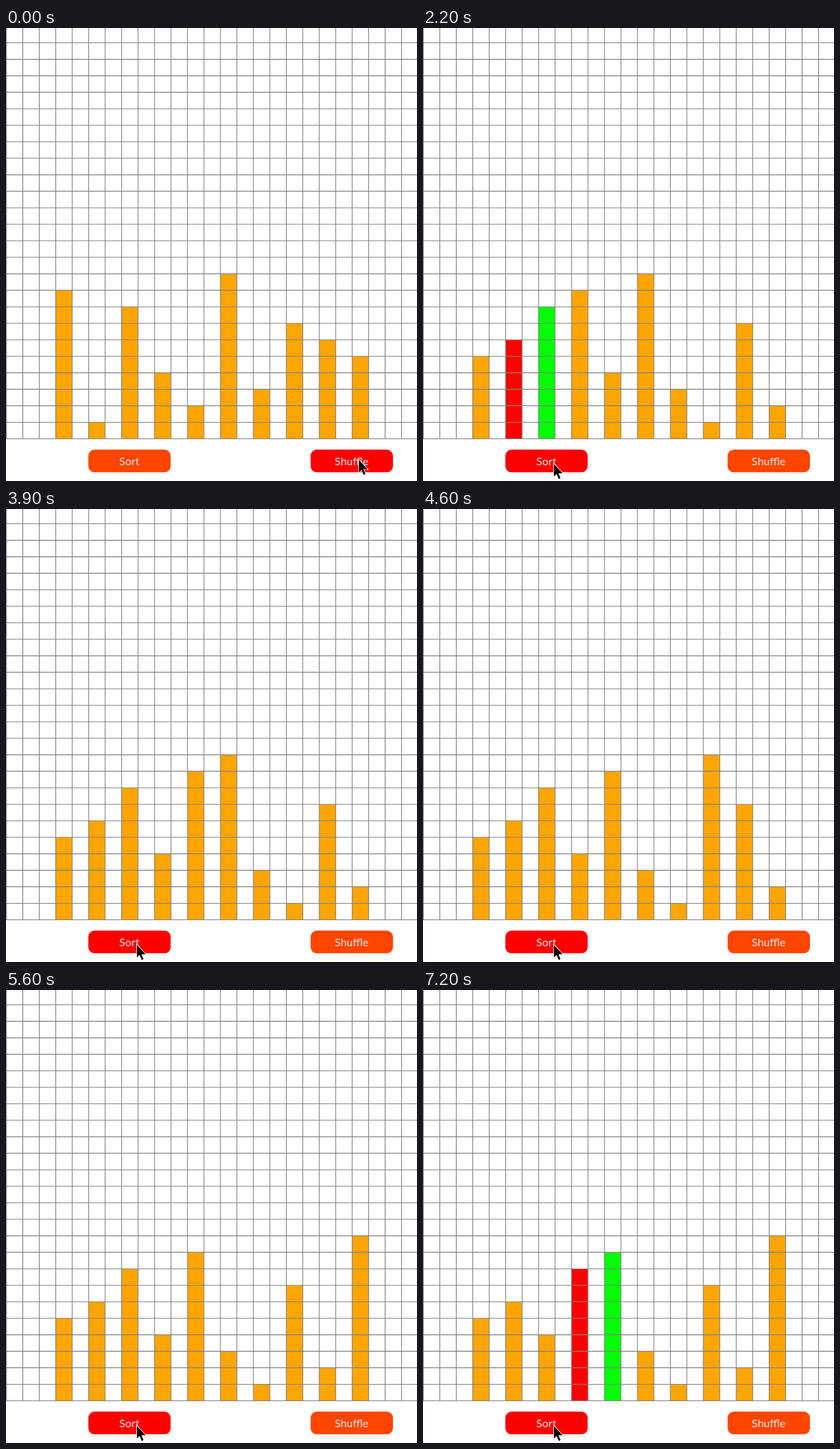
Animation, 600 px wide and 660 px high, one loop 7400 ms. Source, as an HTML page with a canvas:

```html
<!DOCTYPE html>
<html lang="en">
<head>
<meta charset="utf-8">
<title>Bubble sort</title>
<style>
  html, body { margin: 0; width: 600px; height: 660px; overflow: hidden; background: #fff; }
  canvas { display: block; }
</style>
</head>
<body>
<canvas id="stage" width="600" height="660"></canvas>
<script>
const ctx = document.getElementById("stage").getContext("2d");
const LOOP = 7400, TICK = 100;
const CELL = 24.04, LEFT = 0.5, FLOOR = 598.5;

const BEFORE = [9, 1, 8, 4, 2, 10, 3, 7, 6, 5];
const SHUFFLED = [5, 6, 8, 9, 4, 10, 3, 1, 7, 2];
const SHUFFLE_AT = 100;

// Each comparison is highlighted for a while, then swapped if needed
const SORT_AT = 1660, STEP = 458, HIGHLIGHT = 190;

const BUTTONS = [{ label: "Sort", x: 120.2 }, { label: "Shuffle", x: 444.7 }];
const BUTTON = { y: 614.3, w: 120.2, h: 33, r: 9 };

function ease(u) {
  u = Math.min(1, Math.max(0, u));
  return u * u * (3 - 2 * u);
}

function barsAt(t) {
  if (t < SHUFFLE_AT) return { heights: BEFORE, active: -1 };
  const heights = [...SHUFFLED];
  let active = -1;
  for (let step = 0, start = SORT_AT; start <= t; step++, start += STEP) {
    const i = step % (heights.length - 1);
    if (t < start + HIGHLIGHT) active = i;
    else if (heights[i] > heights[i + 1])
      [heights[i], heights[i + 1]] = [heights[i + 1], heights[i]];
  }
  return { heights, active };
}

// From "Shuffle" to "Sort" along a shallow arc, then a slight settle upwards
function pointerAt(t) {
  const k = ease(t / 1000), settle = ease((t - 1100) / 200);
  return [515 - 324 * k, 629 + 8 * k - 30 * Math.sin(Math.PI * k) - 2 * settle];
}

function drawBars({ heights, active }) {
  heights.forEach((h, i) => {
    const isPair = active >= 0 && (i === active || i === active + 1);
    ctx.fillStyle = !isPair ? "#ffa500" : i === active ? "#f00" : "#0f0";
    ctx.fillRect(LEFT + (3 + 2 * i) * CELL, FLOOR - h * CELL, CELL, h * CELL);
  });
}

function drawGrid() {
  ctx.beginPath();
  for (let x = LEFT; x < 600; x += CELL) { ctx.moveTo(x, 0); ctx.lineTo(x, FLOOR); }
  for (let y = FLOOR; y > 0; y -= CELL) { ctx.moveTo(0, y); ctx.lineTo(600, y); }
  ctx.strokeStyle = "#808080";
  ctx.lineWidth = 1.1;
  ctx.stroke();
}

function drawButton({ label, x }, [px, py]) {
  const { y, w, h, r } = BUTTON;
  const hover = px >= x && px <= x + w && py >= y && py <= y + h;
  ctx.fillStyle = hover ? "#f00" : "#ff4500";
  ctx.beginPath();
  ctx.roundRect(x, y, w, h, r);
  ctx.fill();
  ctx.fillStyle = "#eee";
  ctx.font = "16px Lato, sans-serif";
  ctx.textAlign = "center";
  ctx.fillText(label, x + w / 2 - 0.3, 637);
}

const arrow = new Path2D("M0 0V18.5L4 14.8L7.2 22L9.8 20.8L6.7 13.7H12.8Z");

function drawPointer([x, y]) {
  ctx.save();
  ctx.translate(x, y);
  ctx.lineWidth = 1.6;
  ctx.strokeStyle = "#fff";
  ctx.stroke(arrow);
  ctx.fillStyle = "#000";
  ctx.fill(arrow);
  ctx.restore();
}

function draw() {
  const t = Math.floor((performance.now() % LOOP) / TICK) * TICK;
  const tip = pointerAt(t);
  ctx.fillStyle = "#fff";
  ctx.fillRect(0, 0, 600, 660);
  drawBars(barsAt(t));
  drawGrid();
  BUTTONS.forEach(button => drawButton(button, tip));
  drawPointer(tip);
  requestAnimationFrame(draw);
}
draw();
</script>
</body>
</html>
```
